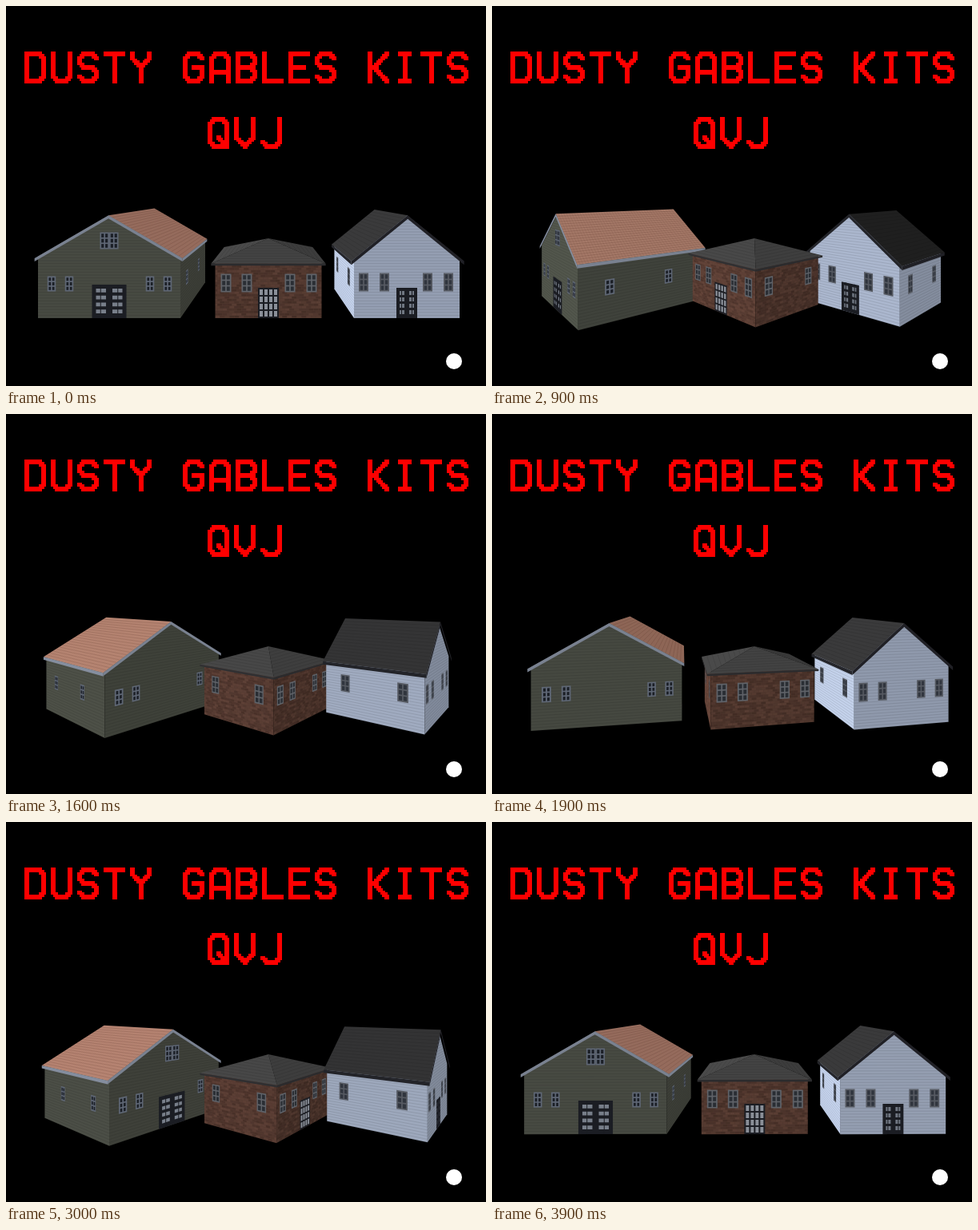
Recreate the animation shown at these times as an HTML page with a canvas. Size 600 px wide and 476 px high, loop 4000 ms.

```html
<!DOCTYPE html>
<html lang="en">
<head>
<meta charset="utf-8">
<title>Dusty Gables Kits</title>
<style>
html, body { margin: 0; width: 100%; height: 100%; overflow: hidden; background: #000; }
canvas { display: block; }
</style>
</head>
<body>
<canvas id="stage" width="600" height="476" role="img" aria-label="DUSTY GABLES KITS QVJ"></canvas>
<script>
const ctx = document.getElementById('stage').getContext('2d');
const STEP = 100, STEPS = 40, TURN_STEPS = 39.7;
// Perspective: the front walls start at depth 0, where one unit is one pixel.
const VANISH_X = 328, VANISH_Y = 232, DISTANCE = 436, GROUND = 159;

const houses = {
  green: {
    x: -199, hw: 89, hd: 85.5, eave: 83.5, ridge: 30, overX: 3, overZ: 2, trim: 4,
    wall: [96, 100, 89], roof: [200, 146, 126], trimColor: [134, 143, 160],
    frame: [94, 102, 116], pane: [27, 31, 38], texture: siding, tiles: [20, 44],
    windows: { u: [-72, -50, 51, 73], side: [-50, 29], y: 116, w: 10.5, h: 19 },
    door: { hw: 21.5, top: 117, cols: 2, rows: 4, gap: 4, glass: [120, 127, 138] }, loft: true
  },
  brick: {
    x: 0, hw: 66.5, hd: 60, eave: 90, ridge: 67, overX: 4.5, overZ: 4, trim: 2.5, hip: true,
    wall: [108, 74, 62], roof: [76, 76, 76], trimColor: [48, 48, 50],
    frame: [95, 98, 104], pane: [42, 46, 52], texture: bricks, tiles: [10, 0],
    windows: { u: [-53, -27, 27, 54], side: [-38, 38], y: 115, w: 13, h: 23 },
    door: { hw: 13, top: 121, cols: 4, rows: 4, gap: 2, glass: [138, 143, 152] }
  },
  white: {
    x: 173, hw: 66, hd: 65, eave: 87, ridge: 30, overX: 4, overZ: 3, trim: 4.5,
    wall: [200, 214, 240], roof: [58, 58, 59], trimColor: [35, 36, 41],
    frame: [86, 90, 98], pane: [48, 53, 62], texture: siding, tiles: [15, 0],
    windows: { u: [-54, -28, 26, 52], side: [-36, 40], y: 114, w: 12, h: 23 },
    door: { hw: 13, top: 121, cols: 2, rows: 4, gap: 3, glass: [112, 119, 130] }
  }
};

// Strokes on a 5 by 7 grid; every point is a column and a row.
const glyphs = {
  A: '06 01 10 30 41 46|04 44',
  B: '00 30 41 42 33 44 45 36 06 00|03 33',
  D: '00 30 41 45 36 06 00',
  E: '40 00 06 46|03 33',
  G: '41 30 10 01 05 16 36 45 43 23',
  I: '10 30|20 26|16 36',
  J: '40 45 36 16 05',
  K: '00 06|40 13 46',
  L: '00 06 46',
  Q: '10 30 41 45 36 16 05 01 10|24 46',
  S: '41 30 10 01 02 13 33 44 45 36 16 05',
  T: '00 40|20 26',
  U: '00 05 16 36 45 40',
  V: '00 04 26 44 40',
  Y: '00 01 23 41 40|23 26'
};

const rgb = (color, gain = 1) =>
  `rgb(${color.map(c => Math.min(255, Math.round(c * gain))).join(',')})`;

function random(seed) {
  const v = Math.sin(seed * 12.9898) * 43758.5453;
  return v - Math.floor(v);
}

function drawGlyph(strokes, left, top) {
  const w = 5.25, h = 5.72, bold = 1;
  const cell = (c, r) => {
    const x = Math.round(left + c * w), y = Math.round(top + r * h);
    ctx.fillRect(x, y, Math.round(left + (c + 1) * w) - x + bold, Math.round(top + (r + 1) * h) - y);
  };
  for (const stroke of strokes.split('|')) {
    const points = stroke.split(' ').map(p => [+p[0], +p[1]]);
    points.slice(1).forEach(([c1, r1], i) => {
      const [c0, r0] = points[i];
      const n = Math.max(Math.abs(c1 - c0), Math.abs(r1 - r0));
      const dc = (c1 - c0) / n, dr = (r1 - r0) / n;
      for (let k = 0; k <= n; k++) {
        cell(c0 + dc * k, r0 + dr * k);
        if (dc && dr && k < n) cell(c0 + dc * (k + 0.5), r0 + dr * (k + 0.5));
      }
    });
  }
}

function drawText(text, left, top) {
  ctx.fillStyle = '#fe0000';
  [...text].forEach((ch, i) => glyphs[ch] && drawGlyph(glyphs[ch], left + i * 33, top));
}

function trace(points) {
  ctx.beginPath();
  points.forEach(([x, y]) => ctx.lineTo(x, y));
  ctx.closePath();
}

function fill(points, color) {
  trace(points);
  ctx.fillStyle = color;
  ctx.fill();
}

function line(a, b) {
  ctx.beginPath();
  ctx.moveTo(...a);
  ctx.lineTo(...b);
  ctx.stroke();
}

// Outward faces run clockwise on screen.
function facesCamera(points) {
  return points.reduce((sum, [x, y], i) => {
    const [nx, ny] = points[(i + 1) % points.length];
    return sum + x * ny - nx * y;
  }, 0) > 0;
}

function clipped(points, color, detail) {
  fill(points, color);
  ctx.save();
  trace(points);
  ctx.clip();
  detail();
  ctx.restore();
}

function box(at, u, v, w, h, color) {
  fill([at(u, v), at(u + w, v), at(u + w, v + h), at(u, v + h)], color);
}

function grid(at, u, v, w, h, cols, rows, gap, color) {
  const cw = (w - gap * (cols + 1)) / cols, ch = (h - gap * (rows + 1)) / rows;
  for (let c = 0; c < cols; c++)
    for (let r = 0; r < rows; r++)
      box(at, u + gap + c * (cw + gap), v + gap + r * (ch + gap), cw, ch, color);
}

function siding(at, half, top) {
  ctx.strokeStyle = 'rgba(0,0,0,.1)';
  ctx.lineWidth = 1;
  for (let v = GROUND; v > top; v -= 3.6) line(at(-half, v), at(half, v));
}

function bricks(at, half, top) {
  for (let row = 0, v = GROUND - 3; v > top - 3; v -= 3, row++)
    for (let u = -half - (row % 2) * 3, i = 0; u < half; u += 6, i++) {
      const n = random(row * 31 + i + 1);
      box(at, u, v, 5.5, 2.5, n < 0.55 ? `rgba(25,12,8,${0.06 + n * 0.3})` : `rgba(160,110,92,${(n - 0.5) * 0.25})`);
    }
}

function drawWindow(at, h, u, v, w, height, cols = 2) {
  box(at, u - w / 2, v - height / 2, w, height, rgb(h.frame));
  grid(at, u - w / 2, v - height / 2, w, height, cols, 3, 1.7, rgb(h.pane));
}

function drawDoor(at, { hw, top, cols, rows, gap, glass }) {
  const height = GROUND - top;
  box(at, -hw, top, hw * 2, height, 'rgb(27,29,35)');
  if (cols === 4) return grid(at, -hw, top, hw * 2, height, cols, rows, gap, rgb(glass));
  for (const u of [-hw + 1, 0])
    grid(at, u, top + 1, hw - 1, height - 3, 1, rows, gap, rgb(glass));
  ctx.strokeStyle = 'rgb(27,29,35)';
  ctx.lineWidth = 1;
  for (const u of [-hw / 2, hw / 2]) line(at(u, top), at(u, GROUND));
}

const wallLight = nx => 0.74 + 0.5 * Math.max(0, -nx - 0.5) - 0.12 * Math.max(0, nx);
const roofLight = nx => 0.72 - 0.28 * nx;
const softRoofLight = nx => 0.88 - 0.09 * nx;

function drawHouse(h, angle) {
  const c = Math.cos(angle), s = Math.sin(angle);
  const project = (lx, y, lz) => {
    const scale = DISTANCE / (DISTANCE + h.hd - lx * s + lz * c);
    return [VANISH_X + (h.x + lx * c + lz * s) * scale, VANISH_Y + y * scale];
  };
  // Sides: 0 front, 1 right, 2 back, 3 left; u runs left to right seen from outside.
  const sideAt = (i, w, d) => (u, v) => [
    () => project(u, v, -d), () => project(w, v, u),
    () => project(-u, v, d), () => project(-w, v, -u)
  ][i]();
  const normals = [-s, c, s, -c];
  const rw = h.hw + h.overX, rd = h.hd + h.overZ;
  const wallTop = h.hip ? h.eave : h.ridge + (h.eave - h.ridge) * h.hw / rw;

  for (let i = 0; i < 4; i++) {
    const gable = i % 2 === 0;
    const at = sideAt(i, h.hw, h.hd), half = gable ? h.hw : h.hd;
    const outline = [at(-half, wallTop), at(half, wallTop), at(half, GROUND), at(-half, GROUND)];
    if (!facesCamera(outline)) continue;
    const peaked = gable && !h.hip;
    if (peaked) outline.splice(1, 0, at(0, h.ridge));
    clipped(outline, rgb(h.wall, wallLight(normals[i])),
      () => h.texture(at, half, peaked ? h.ridge : wallTop));
    const win = h.windows;
    const places = gable ? win.u : win.side.map(u => i === 1 ? u : -u);
    places.forEach(u => drawWindow(at, h, u, win.y, gable ? win.w : win.w + 1, win.h));
    if (i === 0) {
      drawDoor(at, h.door);
      if (h.loft) [-5.8, 5.8].forEach(u => drawWindow(at, h, u, 62, 11.5, 21));
    }
  }

  for (let i = 0; i < 4; i++) {
    if (!h.hip && i % 2 === 0) continue;
    const at = sideAt(i, rw, rd), half = i % 2 ? rd : rw;
    const ridge = i === 1 ? [-rd, rd] : [rd, -rd];
    const a = h.hip ? project(0, h.ridge, 0) : project(0, h.ridge, ridge[0]);
    const b = h.hip ? a : project(0, h.ridge, ridge[1]);
    const outline = [a, b, at(half, h.eave), at(-half, h.eave)];
    if (!facesCamera(outline)) continue;
    const light = h.tiles[1] || h.hip ? softRoofLight : roofLight;
    clipped(outline, rgb(h.roof, light(normals[i])), () => drawTiles(outline, h.tiles));
  }

  for (let i = 0; i < 4; i++) {
    const at = sideAt(i, rw, rd), half = i % 2 ? rd : rw, e = h.eave, t = h.trim;
    const strip = [at(-half, e), at(half, e), at(half, e + t), at(-half, e + t)];
    if (!facesCamera(strip)) continue;
    const color = rgb(h.trimColor, 0.9 + 0.15 * Math.max(0, -normals[i]));
    if (h.hip || i % 2) fill(strip, color);
    else fill([at(-half, e), at(0, h.ridge), at(half, e),
      at(half, e + t), at(0, h.ridge + t), at(-half, e + t)], color);
  }
}

function drawTiles([a, b, d, e], [rows, cols]) {
  const mix = (p, q, k) => [p[0] + (q[0] - p[0]) * k, p[1] + (q[1] - p[1]) * k];
  ctx.lineWidth = 1;
  ctx.strokeStyle = cols ? 'rgba(60,25,15,.14)' : 'rgba(0,0,0,.1)';
  for (let r = 1; r < rows; r++) line(mix(a, e, r / rows), mix(b, d, r / rows));
  ctx.strokeStyle = 'rgba(60,25,15,.08)';
  for (let i = 1; i < cols; i++) line(mix(a, b, i / cols), mix(e, d, i / cols));
}

// Depth of the corner that reaches furthest to one side (1 right, -1 left).
function reachDepth(h, angle, side) {
  const c = Math.cos(angle), s = Math.sin(angle);
  const lx = h.hw * side * (Math.sign(c) || 1), lz = h.hd * side * (Math.sign(s) || 1);
  return h.hd - lx * s + lz * c;
}

function drawScene(step) {
  const t = step / TURN_STEPS;
  const angle = 2 * Math.PI * t * t * (3 - 2 * t);
  const { green, brick, white } = houses;
  ctx.fillStyle = '#000';
  ctx.fillRect(0, 0, 600, 476);
  drawText('DUSTY GABLES KITS', 23, 57);
  drawText('QVJ', 252, 139);

  const order = [brick];
  const place = (h, side) =>
    reachDepth(h, angle, -side) > reachDepth(brick, angle, side) ? order.unshift(h) : order.push(h);
  place(green, -1);
  place(white, 1);
  order.forEach(h => drawHouse(h, angle));

  ctx.fillStyle = '#fff';
  ctx.beginPath();
  ctx.arc(560, 445, 10, 0, 2 * Math.PI);
  ctx.fill();
}

let shown = -1;
function tick() {
  const step = Math.floor(performance.now() / STEP) % STEPS;
  if (step !== shown) drawScene(shown = step);
  requestAnimationFrame(tick);
}
tick();
</script>
</body>
</html>
```
